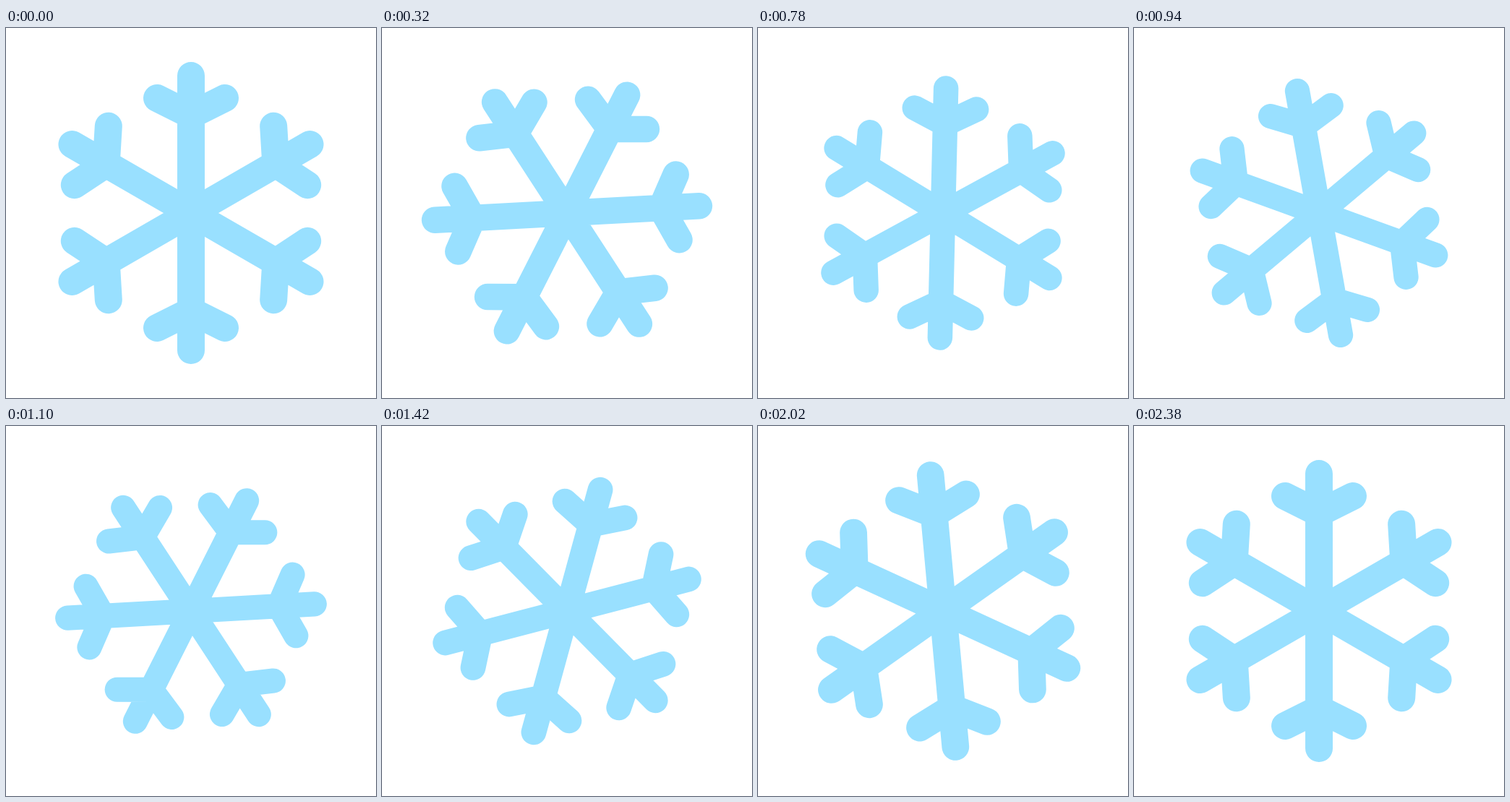
An HTML page for the animation above (2400 ms loop, 512 by 512 pixels).

```html
<!DOCTYPE html>
<html lang="en">
<head>
<meta charset="utf-8">
<title>Snowflake</title>
<style>
  html, body { margin: 0; width: 100%; height: 100%; overflow: hidden; background: #fff; }
  svg { display: block; width: 100vw; height: 100vh; }
</style>
</head>
<body>
<svg viewBox="-256 -256 512 512">
  <path id="flake" fill="none" stroke="#99e0ff" stroke-width="38" stroke-linecap="round" stroke-linejoin="round"/>
</svg>
<script>
  const LOOP = 2400;
  const flake = document.getElementById('flake');

  // One arm: a stem from the centre and two side twigs.
  const arm = [[[0, 0], [0, -190]], [[-47, -159], [0, -135.5], [47, -159]]];

  function rotated([x, y], angle) {
    const c = Math.cos(angle), s = Math.sin(angle);
    return [x * c - y * s, x * s + y * c].map(v => v.toFixed(2)).join(' ');
  }

  let d = '';
  for (let i = 0; i < 6; i++) {
    for (const line of arm) {
      d += 'M' + line.map(p => rotated(p, i * Math.PI / 3)).join('L');
    }
  }
  flake.setAttribute('d', d);

  // cubic-bezier(.33, 0, .2, 1), solved by bisection
  function ease(x) {
    let lo = 0, hi = 1;
    for (let i = 0; i < 30; i++) {
      const s = (lo + hi) / 2, r = 1 - s;
      if (3 * r * r * s * 0.33 + 3 * r * s * s * 0.2 + s * s * s < x) lo = s;
      else hi = s;
    }
    return lo * lo * (3 - 2 * lo);
  }

  function draw(now) {
    const t = (now % LOOP) / LOOP;
    const angle = 360 * ease(t);
    const scale = t < 0.5 ? 1 - 0.1 * ease(t * 2) : 0.9 + 0.1 * ease(t * 2 - 1);
    flake.setAttribute('transform', `rotate(${angle}) scale(${scale})`);
  }

  function tick() {
    draw(performance.now());
    requestAnimationFrame(tick);
  }
  tick();
</script>
</body>
</html>
```
